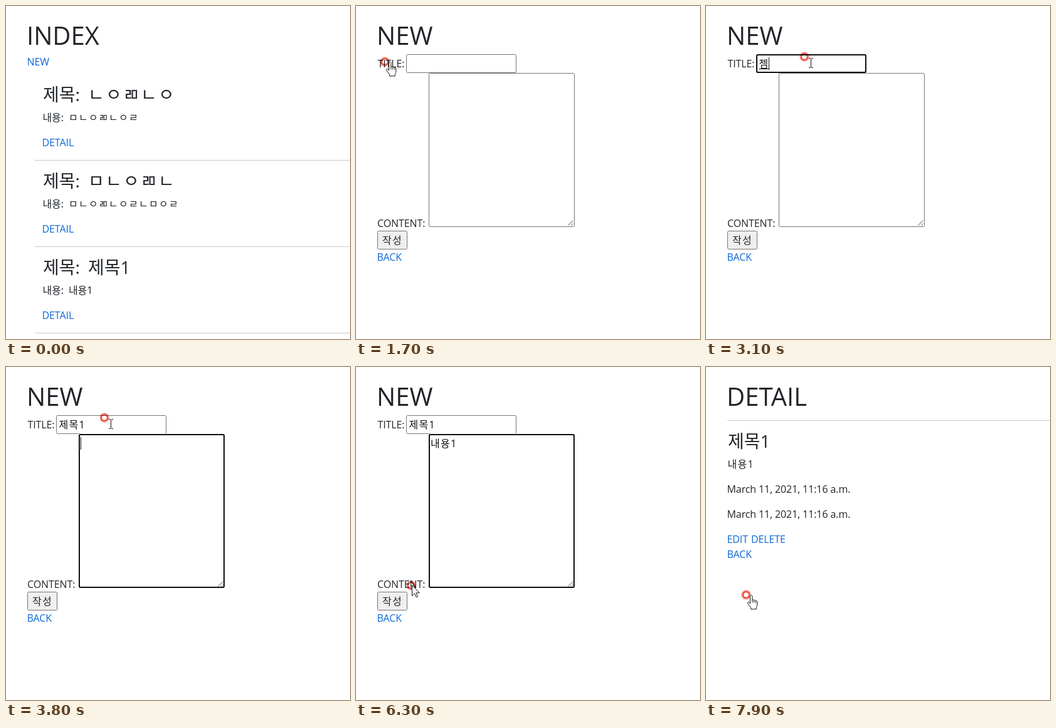
These frames come from a looping animation (549x532 px, 8 s). An HTML page:

```html
<!DOCTYPE html>
<html lang="ko">
<head>
<meta charset="utf-8">
<title>Board</title>
<style>
  html, body { margin: 0; width: 100%; height: 100%; overflow: hidden; background: #fff; }
  svg { display: block; }
  text { font: 16px "Open Sans", "Noto Sans CJK KR", "Noto Sans CJK", sans-serif; fill: #212529; letter-spacing: -.1px; white-space: pre; }
  .h1 { font-size: 40px; letter-spacing: 0; }
  .h3 { font-size: 28px; letter-spacing: 0; }
  .wide { letter-spacing: .08em; }
  .link { fill: #0d68d8; }
  .hr { stroke: #c8c9ca; }
  .box { fill: #fff; stroke: #767676; }
  .focus { fill: none; stroke: #101010; stroke-width: 2; }
  .typed { fill: #111; letter-spacing: .08em; }
  .mark { stroke: #111; }
  #ring { mix-blend-mode: multiply; }
</style>
</head>
<body>
<svg width="549" height="532" viewBox="0 0 549 532">
  <defs>
    <radialGradient id="glow">
      <stop offset=".36" stop-color="#fff"/>
      <stop offset=".48" stop-color="#f0604f"/>
      <stop offset=".58" stop-color="#e83a28"/>
      <stop offset=".7" stop-color="#f06a5a" stop-opacity=".8"/>
      <stop offset="1" stop-color="#f8b0a5" stop-opacity="0"/>
    </radialGradient>
  </defs>

  <g id="index">
    <text class="h1" x="33" y="62">INDEX</text>
    <text class="link" x="33.5" y="95">NEW</text>
  </g>

  <g id="form">
    <text class="h1" x="33" y="62">NEW</text>
    <text x="34.5" y="98">TITLE:</text>
    <rect class="box" x="80.5" y="77.5" width="175" height="29" rx="2"/>
    <rect class="focus" id="titleFocus" x="81" y="78" width="174" height="28" rx="2"/>
    <text x="34" y="353">CONTENT:</text>
    <rect class="box" x="116.5" y="107.5" width="232" height="245" rx="1"/>
    <g id="contentFocus">
      <rect x="115.5" y="106.5" width="234" height="247" rx="3" fill="none" stroke="#fff"/>
      <rect class="focus" x="117" y="108" width="231" height="244" rx="2"/>
    </g>
    <path d="M338.5 350.5l8-8M343.5 350.5l3-3" stroke="#555" fill="none"/>
    <rect x="34.5" y="359.5" width="47" height="29" rx="2" fill="#efefef" stroke="#767676"/>
    <text class="wide" x="42" y="380">작성</text>
    <text class="link" x="33.5" y="407">BACK</text>
    <text class="typed" id="title" x="84.5" y="98"></text>
    <text class="typed" id="content" x="119" y="128"></text>
    <path class="mark" id="under"/>
    <path class="mark" id="caret"/>
  </g>

  <g id="detail">
    <text class="h1" x="33" y="62">DETAIL</text>
    <path class="hr" d="M34 85.5H549"/>
    <text class="h3" x="35" y="129">제목1</text>
    <text x="34.5" y="161" class="wide">내용1</text>
    <text x="33.5" y="201">March 11, 2021, 11:16 a.m.</text>
    <text x="33.5" y="241">March 11, 2021, 11:16 a.m.</text>
    <text class="link" x="33.5" y="281">EDIT</text>
    <text class="link" x="72" y="281">DELETE</text>
    <text class="link" x="33.5" y="305">BACK</text>
  </g>

  <g id="pointer">
    <circle id="ring" r="9" fill="url(#glow)"/>
    <g stroke="#111" fill="#fff" stroke-linejoin="round">
      <path id="arrow" d="M1.5-.5v17l4-3.7 2.6 6 2.4-1-2.6-5.9h5.4z"/>
      <path id="hand" d="M6.5 2.5c0-2.6 3.4-2.6 3.4 0v6c.4-1 2.6-.8 2.8.6.6-1 2.6-.6 2.7.8.8-.9 2.4-.4 2.4 1v5c0 2-1.4 3.600-1.600 5v2h-8.500v-2c-1.500-2.500-4-5-5.200-7.600-.6-1.600 1.200-2.300 2.300-1.200l1.700 1.800zM9.900 8.500v4M12.700 9.500v3M15.400 10.500v2.500"/>
      <path id="beam" fill="none" d="M7 2.500h2.500l1 1 1-1h2.500M10.500 3v14M7 17.500h2.500l1-1 1 1h2.500"/>
    </g>
  </g>
</svg>
<script>
const $ = id => document.getElementById(id);
const LOOP = 8000;

// List rows, 138 px apart
const rows = [
  ['ㄴㅇㄻㄴㅇ', 'ㅁㄴㅇㄻㄴㅇㄹ', 'wide'],
  ['ㅁㄴㅇㄻㄴ', 'ㅁㄴㅇㄻㄴㅇㄹㄴㅁㅇㄹ', 'wide'],
  ['제목1', '내용1', '']
];
$('index').insertAdjacentHTML('beforeend', rows.map(([title, content, cls], i) => `
  <g transform="translate(0 ${i * 138})">
    <text class="h3" x="59" y="152">제목:</text>
    <text class="h3 ${cls}" x="131" y="152">${title}</text>
    <text x="58.5" y="184">내용:</text>
    <text class="${cls}" x="100" y="184">${content}</text>
    <text class="link" x="57.5" y="224">DETAIL</text>
    <path class="hr" d="M46 246.500H549"/>
  </g>`).join(''));

const pages = [[0, 'index'], [1600, 'form'], [7000, 'detail']];
const shapes = [[0, 'arrow'], [1100, 'hand'], [1980, 'arrow'], [2250, 'beam'], [6180, 'arrow'], [6450, 'hand']];
const path = [[500, 205, -14], [1200, 46, 89], [1900, 46, 89], [2500, 157, 81],
              [6000, 157, 81], [6300, 88, 349], [6600, 64, 364]];

// time, field, finished text, syllable being composed
const typing = [
  [0, '', '', ''],
  [2600, 'title', '', ''], [2800, 'title', '', 'ㅈ'], [2900, 'title', '', '제'], [3100, 'title', '', '젬'],
  [3200, 'title', '', '제모'], [3300, 'title', '', '제목'], [3500, 'title', '제목1', ''],
  [3700, 'content', '', ''], [4500, 'content', '', 'ㄴ'], [4700, 'content', '', '내'],
  [5000, 'content', '내', 'ㅇ'], [5100, 'content', '내', '요'], [5200, 'content', '내', '용'],
  [5500, 'content', '내용1', '']
].map(([time, field, done, open]) => [time, field, done + open.slice(0, -1), open.slice(-1)]);

const fields = { title: { x: 84.5, top: 83 }, content: { x: 119, top: 113 } };

const latest = (list, t) => list.filter(k => k[0] <= t).pop();
const show = (id, on) => $(id).style.display = on ? '' : 'none';
const width = s => [...s].reduce((w, c) => w + (c < '~' ? 9.5 : 16), 0);

function place(t) {
  const i = path.findIndex(k => k[0] > t);
  if (i < 0) return path[path.length - 1].slice(1);
  if (i === 0) return path[0].slice(1);
  const [t0, x0, y0] = path[i - 1], [t1, x1, y1] = path[i];
  const u = (t - t0) / (t1 - t0), e = u * u * (3 - 2 * u);
  return [x0 + (x1 - x0) * e, y0 + (y1 - y0) * e];
}

function drawTyping(t) {
  const [time, field, done, open] = latest(typing, t);
  $('title').textContent = field === 'content' ? '제목1' : done + open;
  $('content').textContent = field === 'content' ? done + open : '';
  show('titleFocus', field === 'title');
  show('contentFocus', field === 'content');
  show('under', open);
  show('caret', field && (t - time) % 1000 < 500);
  if (!field) return;
  const { x, top } = fields[field];
  const start = x + width(done), end = start + width(open);
  $('under').setAttribute('d', `M${start} ${top + 17.5}H${end}`);
  $('caret').setAttribute('d', `M${Math.floor(end) + .5} ${top - 1}v20`);
}

function draw(now) {
  const t = now % LOOP;
  const page = latest(pages, t)[1], shape = latest(shapes, t)[1];
  pages.forEach(([, id]) => show(id, id === page));
  ['arrow', 'hand', 'beam'].forEach(id => show(id, id === shape));
  show('pointer', t >= 500);
  const [x, y] = place(t);
  $('pointer').setAttribute('transform', `translate(${x} ${y})`);
  drawTyping(t);
}

const begin = performance.now();
function tick() {
  draw(performance.now() - begin);
  requestAnimationFrame(tick);
}
tick();
</script>
</body>
</html>
```
